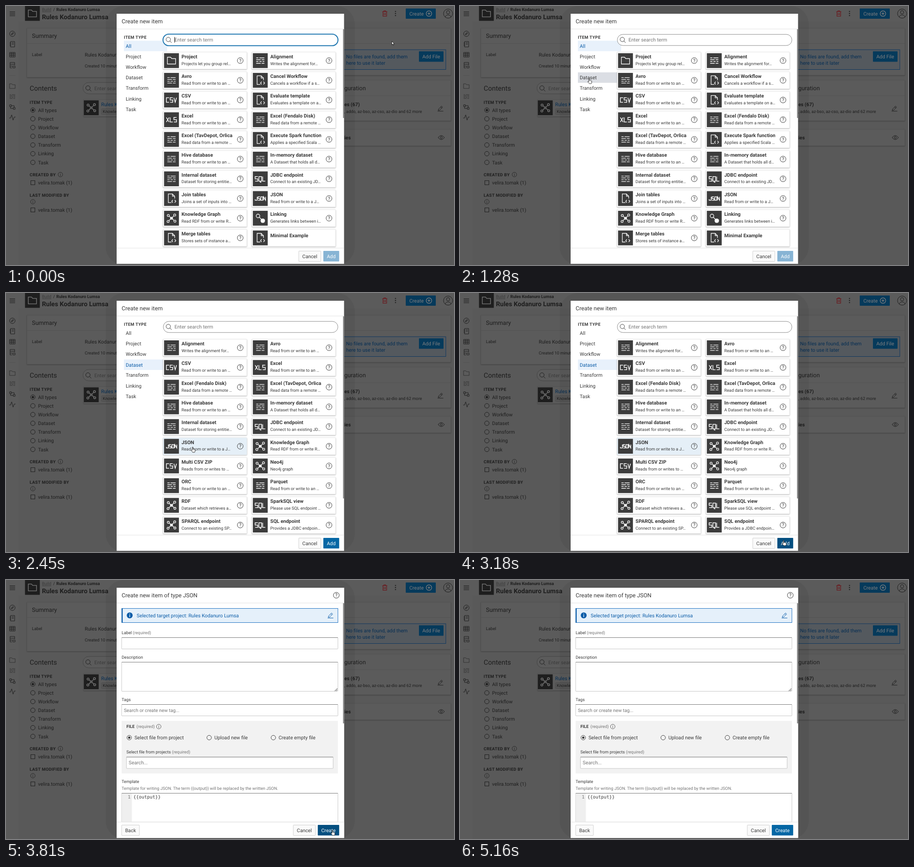
An HTML page that plays this animation: 984x569 px, repeating every 8 s.

```html
<!DOCTYPE html>
<html lang="en">
<head>
<meta charset="utf-8">
<title>Create new item</title>
<style>
html, body { margin: 0; width: 100%; height: 100%; overflow: hidden; background: #5a5a5a; }
svg { display: block; width: 984px; height: 569px; }
text { font: 10.8px Roboto, sans-serif; fill: #3a3a3a; text-rendering: geometricPrecision; white-space: pre; }
.sm { font-size: 9.26px; }
.md { font-size: 10.3px; }
.b { font-weight: 700; }
.cap { font-size: 9.3px; font-weight: 700; letter-spacing: .35px; }
.h1 { font-size: 14.1px; font-weight: 700; }
.h2 { font-size: 12.9px; }
.h3 { font-size: 14.9px; }
.title { font-size: 12.5px; }
.dim { fill: #757575; }
.blue { fill: #0a5ca8; }
.inv { fill: #fff; }
.mid { text-anchor: middle; }
.mono { font: 10px "DejaVu Sans Mono", monospace; }
.ln { fill: none; stroke: #3a3a3a; stroke-width: 1; }
.wl { fill: none; stroke: #fff; stroke-width: 1.3; }
.glyph { fill: none; stroke: #fff; stroke-width: 1.5; vector-effect: non-scaling-stroke; }
.bl { fill: none; stroke: #0a5ca8; stroke-width: 1; }
.red { fill: none; stroke: #da1e28; stroke-width: 1.1; }
.dot { fill: #3a3a3a; }
.white { fill: #fff; }
.tile { fill: #3c3c3c; }
.card { fill: #fff; stroke: #dcdcdc; stroke-width: .6; filter: drop-shadow(0 1px 1px rgba(0,0,0,.28)); }
.rule { fill: #dcdcdc; }
.field { fill: #fff; stroke: #b9b9b9; stroke-width: .8; }
.round { fill: #fff; stroke: #8a8a8a; stroke-width: 1; }
.sel { fill: #e8f1fb; }
.info { fill: #e5f0fa; stroke: #1a6fc0; stroke-width: 1; }
.btn { fill: #0567a5; }
.plain { fill: #fafafa; stroke: #c4c4c4; stroke-width: .8; }

/* The page behind the dialog */
.page .white, .page .card, .page .round { fill: #b8b8b8; }
.page .card { stroke: #a4a4a4; }
.page .rule { fill: #a4a4a4; }
.page .plain { fill: #aeaeae; stroke: #949494; }
.page .info { fill: #a9b3bd; }
.page .btn { fill: #0c74b8; }

/* 1% = 80 ms */
.all, .data, .picker, .form, .hover, .focus, .caret, .pick, .add, .create, .arrow, .hand, .cursor {
  animation: 8s step-end infinite;
}
.all { animation-name: all; }
.data { animation-name: data; }
.picker { animation-name: picker; }
.form { animation-name: form; }
.hover { animation-name: hover; fill: #dbdee4; }
.focus { animation-name: focus; }
.caret { animation-name: caret; }
.pick { animation-name: pick; fill: #e5eff7; }
.add { animation-name: add; }
.create { animation-name: create; }
.arrow { animation-name: arrow; }
.hand { animation-name: hand; }
.cursor { animation-name: move; }
.arrow path, .hand path { fill: #fff; stroke: #000; stroke-width: .8; stroke-linejoin: round; }
@keyframes all { 0% { opacity: 1 } 17.75%, 100% { opacity: 0 } }
@keyframes data { 0% { opacity: 0 } 17.75% { opacity: 1 } 47.625%, 100% { opacity: 0 } }
@keyframes picker { 0% { opacity: 1 } 47.625%, 100% { opacity: 0 } }
@keyframes form { 0% { opacity: 0 } 47.625%, 100% { opacity: 1 } }
@keyframes hover { 0% { opacity: 0 } 11.5% { opacity: .4 } 13% { opacity: .8 } 14.5% { opacity: 1 } 17.75%, 100% { opacity: 0 } }
@keyframes focus { 0% { opacity: 1 } 14.5%, 100% { opacity: 0 } }
@keyframes caret { 0% { opacity: 1 } 1.875% { opacity: 0 } 10% { opacity: 1 } 14.5%, 100% { opacity: 0 } }
@keyframes pick { 0% { opacity: 0 } 30.625%, 100% { opacity: 1 } }
@keyframes add { 0% { fill: #87b4d4 } 30.625% { fill: #0567a5 } 39.75% { fill: #044f80 } 46.125%, 100% { fill: #063a5e } }
@keyframes create { 0% { fill: #044f80 } 54.625%, 100% { fill: #0567a5 } }
@keyframes arrow {
  0% { opacity: 1 } 3.375% { opacity: 0 } 37.875% { opacity: 1 } 39.75% { opacity: 0 }
  54.625% { opacity: 1 } 64.5%, 100% { opacity: 0 }
}
@keyframes hand {
  0% { opacity: 0 } 3.375% { opacity: 1 } 37.875% { opacity: 0 } 39.75% { opacity: 1 } 54.625%, 100% { opacity: 0 }
}
@keyframes move {
  0% { transform: translate(847px, 77px) }
  1.875% { transform: translate(800px, 88px) }
  3.375% { transform: translate(620px, 128px) }
  4.875% { transform: translate(440px, 165px) }
  6.375% { transform: translate(359px, 179px) }
  8.25% { transform: translate(346px, 176px) }
  10% { transform: translate(318px, 170px) }
  11.5% { transform: translate(296px, 163px) }
  13% { transform: translate(285px, 160px) }
  14.5%, 16% { transform: translate(280px, 158.5px) }
  17.75% { transform: translate(297px, 175px) }
  19.25% { transform: translate(345px, 199px) }
  20.75% { transform: translate(382px, 216px) }
  23.875% { transform: translate(382px, 237px) }
  25.625% { transform: translate(394px, 290px) }
  27.125% { transform: translate(406px, 338px) }
  32.5% { transform: translate(419px, 347px) }
  36.375% { transform: translate(566px, 448px) }
  37.875% { transform: translate(697px, 535px) }
  39.75% { transform: translate(707px, 543px) }
  41.25% { transform: translate(713px, 549px) }
  54.625% { transform: translate(690px, 505px) }
  56.125% { transform: translate(612px, 402px) }
  57.625% { transform: translate(537px, 313px) }
  61.125% { transform: translate(372px, 311px) }
  62.625%, 100% { transform: translate(206px, 308px) }
}
</style>
</head>
<body>
<svg id="stage" viewBox="0 0 984 569" xmlns="http://www.w3.org/2000/svg"></svg>
<script>
const project = 'Rules Kodanuro Lumsa', user = 'velira.tomak (1)';

const text = (x, y, s, cls = '') => `<text x="${x}" y="${y}" class="${cls}">${s}</text>`;
const rect = (x, y, w, h, cls, rx = 0) => `<rect x="${x}" y="${y}" width="${w}" height="${h}" rx="${rx}" class="${cls}"/>`;
const circle = (x, y, r, cls = 'ln') => `<circle cx="${x}" cy="${y}" r="${r}" class="${cls}"/>`;
const path = (d, cls = 'ln', x = 0, y = 0) => `<path d="${d}" class="${cls}" transform="translate(${x} ${y})"/>`;
const group = (cls, body, x = 0, y = 0) => `<g class="${cls}"><g transform="translate(${x} ${y})">${body}</g></g>`;

const help = (x, y) => circle(x, y, 6.4) + text(x, y + 3.7, '?', 'mid');
const info = (x, y) => circle(x, y, 5, 'ln" stroke-opacity=".8') + path('M0-.8V3M0-3v1.1', 'ln" stroke-opacity=".8', x, y);
const lens = (x, y) => circle(x - 1, y - 1, 4.8) + path('M2.4 2.4 6.3 6.3', 'ln', x, y);
const pencil = (x, y, cls = 'ln') => path('M-4 1.5 2.6-5 5-2.6-1.6 3.8-4.6 4.3ZM.8-3.2 3.2-.8M-6 6H6.5', cls, x, y);
const radio = (x, y, label, on) => circle(x, y, 5) + (on ? circle(x, y, 2.5, 'dot') : '') + text(x + 11.5, y + 3.9, label);
const check = (x, y, label) => rect(x - 4.5, y - 4.5, 9, 9, 'ln') + text(x + 11.5, y + 3.9, label);
const button = (x, y, w, h, label, cls, tone = 'inv') =>
  rect(x, y, w, h, cls, 1) + text(x + w / 2, y + h / 2 + 3.9, label, 'mid ' + tone);
const input = (x, y, w, h) => rect(x, y, w, h, 'field', 1) + path(`M0 0H${w}`, 'ln" opacity=".55', x, y);

// Pictograms, drawn around 0,0
const strokes = {
  C: 'M6 0H0V10H6', S: 'M6 0H0V5H6V10H0', V: 'M0 0 3 10 6 0', X: 'M0 0 6 10M6 0 0 10', L: 'M0 0V10H6',
  Q: 'M0 0H6V10H0ZM3 10V12.5H5.5', J: 'M6 0V10H0V7', O: 'M0 0H6V10H0Z', N: 'M0 10V0L6 10V0'
};
const word = s => {
  const k = 3 / s.length, step = 8.2 * k;
  return [...s].map((ch, i) =>
    `<g transform="translate(${-11.2 + i * step} ${-5 * k}) scale(${k * .97} ${k})">${path(strokes[ch], 'glyph')}</g>`).join('');
};
const folder = 'M-9-7.5H-2L.5-4.5H9V7.5H-9Z';
const lines = 'M-9-6H-4M-2-6H9M-9-2H1M3-2H9M-9 2H-4M-2 2H3M5 2H9M-9 6H1M3 6H9';
const graph = [[-7, -6], [7, -7], [-7.5, 7], [7.5, 6.5]];
const icons = {
  folder: path(folder, 'wl'),
  lines: path(lines, 'wl'),
  file: path('M0 9H-7V-10H2L7-5V0M2-10V-5H7M3 3 .5 6 3 9M7 3 9.5 6 7 9', 'wl'),
  graph: graph.map(([x, y]) => path(`M0 0 ${x * .75} ${y * .75}`, 'wl') + circle(x, y, 2.3, 'wl')).join('') + circle(0, 0, 3, 'white'),
  link: circle(-5, -5, 4, 'wl') + path('M-2-2 3 3', 'wl') + circle(5.5, 5.5, 4.8, 'white')
};
const tile = (x, y, name, size = 32.6) => rect(x, y, size, size, 'tile') +
  group('', icons[name] || word(name), x + size / 2, y + size / 2);

const read = 'Read from or write to an …', remote = 'Read data from a remote …';
const items = {
  'Project': ['folder', 'Projects let you group rel…'],
  'Alignment': ['lines', 'Writes the alignment for…'],
  'Avro': ['lines', read],
  'Cancel Workflow': ['file', 'Cancels a workflow if a s…'],
  'CSV': ['CSV', read],
  'Evaluate template': ['file', 'Evaluates a template on a…'],
  'Excel': ['XLS', read],
  'Excel (Fendalo Disk)': ['lines', remote],
  'Excel (TavDepot, Orlica3)': ['lines', remote],
  'Execute Spark function': ['file', 'Applies a specified Scala …'],
  'Hive database': ['lines', read],
  'In-memory dataset': ['lines', 'A Dataset that holds all d…'],
  'Internal dataset': ['lines', 'Dataset for storing entitie…'],
  'JDBC endpoint': ['SQL', 'Connect to an existing JD…'],
  'Join tables': ['file', 'Joins a set of inputs into …'],
  'JSON': ['JSON', 'Read from or write to a J…'],
  'Knowledge Graph': ['graph', 'Read RDF from or write R…'],
  'Linking': ['link', 'Generates links between i…'],
  'Merge tables': ['file', 'Stores sets of instance a…'],
  'Minimal Example': ['file', ''],
  'Multi CSV ZIP': ['CSV', 'Reads from or writes to …'],
  'Neo4j': ['graph', 'Neo4j graph'],
  'ORC': ['lines', read],
  'Parquet': ['lines', read],
  'RDF': ['graph', 'Dataset which retrieves a…'],
  'SparkSQL view': ['SQL', 'Please use SQL endpoint …'],
  'SPARQL endpoint': ['graph', 'Connect to an existing SP…'],
  'SQL endpoint': ['SQL', 'Provides a JDBC endpoin…']
};
const names = Object.keys(items);
const everything = names.slice(0, 20);
const datasets = names.filter(n => !['folder', 'file', 'link'].includes(items[n][0]));

const card = (name, i, pickable) => {
  const [icon, desc] = items[name];
  return group('', rect(0, 0, 184, 37.5, 'card', 1) +
    (pickable && name === 'JSON' ? rect(0, 0, 184, 37.5, 'pick', 1) : '') +
    tile(2.2, 2.5, icon) +
    `<g clip-path="url(#crop)">${text(40.5, desc ? 13.7 : 17.2, name, 'b')}</g>` +
    (desc ? text(40.5, 28.6, desc, 'sm') + help(169.5, 18.7) : ''),
    345 + i % 2 * 195, 101.2 + (i >> 1) * 43.28);
};
const cards = (list, pickable) => list.map((n, i) => card(n, i, pickable)).join('');

const types = ['Project', 'Workflow', 'Dataset', 'Transform', 'Linking', 'Task'];

const sidebar =
  path('M0 0H12M0 3H12M0 6H12M0 9H12', 'ln', 8, 12.5) +
  circle(14, 61, 6) + path('M-2.5 2.5-1-1 2.5-2.5 1 1Z', 'ln', 14, 61) +
  path('M-4-6H5V6H-4ZM-6-3H-3M-6 0H-3M-6 3H-3M-1-3H3M-1 0H3', 'ln', 14, 84) +
  path('M-6-5H6V5H-6ZM-6-2H6M-6 1.5H6M-2-5V5M2-5V5', 'ln', 14, 107) +
  path('M-5-6H5V0M-5-6V6H-1M-5-2H5M-5 2H0M1 2H6V6H1Z', 'ln', 14, 130) +
  rect(7, 152, 14, .8, 'rule') +
  `<g transform="translate(14 176) scale(.68)">${path(folder)}</g>` +
  `<g transform="translate(14 199) scale(.68)">${path(lines)}</g>` +
  path('M-6-5H-2V-1H-6ZM2 1H6V5H2ZM-2-3H4V1M-4-1V3H2', 'ln', 14, 222) +
  path('M-7 1H-4L-1.5-6 1.5 6 4-1H7', 'ln', 14, 245);

const header =
  rect(0, 0, 984, 34, 'white') + tile(41.7, 0, 'folder') +
  text(79, 11.4, 'Build', 'sm dim" text-decoration="underline') + text(103.5, 11.4, '/', 'sm') + text(110.5, 11.4, project, 'sm b') +
  text(79, 29, project, 'h1') +
  path('M-5.5-4H5.5M-4-4V6H4V-4M-2-4V-6H2V-4M-1.5-1V3.5M1.5-1V3.5', 'red', 832, 16.5) +
  [12, 16.5, 21].map(y => circle(855.5, y, 1.2, 'dot')).join('') +
  rect(878, 5.5, 66, 22.5, 'btn', 1) + text(886, 20.6, 'Create', 'inv') +
  circle(929, 16.7, 6, 'wl') + path('M-3 0H3M0-3V3', 'wl', 929, 16.7) +
  circle(971, 16.7, 10) + circle(971, 13.8, 3.6) + path('M-6 7.5Q-5.5 3 0 3T6 7.5', 'ln', 971, 16.7);

const main =
  rect(46, 49, 679, 107.5, 'card') + rect(46, 82, 679, .8, 'rule') +
  text(57, 70.2, 'Summary', 'h2') + text(57, 109.6, 'Label', 'sm') +
  text(173, 111, project) + text(173, 135.4, 'Created 10 minutes ago', 'sm') +
  text(52, 185.7, 'Contents', 'h3') + rect(169, 168, 400, 25, 'round', 12.5) + lens(181, 181) + text(194, 184.6, 'Enter search term', 'dim') +
  text(52, 215.3, 'ITEM TYPE', 'cap') +
  ['All types', ...types].map((s, i) => radio(59, 228.7 + i * 19.15, s, !i)).join('') +
  text(52, 373.7, 'CREATED BY', 'cap') + info(119.5, 370.3) + check(59, 388.2, user) +
  text(52, 418.6, 'LAST MODIFIED BY', 'cap') + info(59, 430) + check(59, 448, user) +
  rect(170.5, 205.5, 400, 37, 'card') + tile(171, 207.3, 'graph') +
  text(209, 220, project, 'blue') + rect(209.5, 225.5, 80, 13, 'plain', 2) + text(212.5, 235.2, 'Knowledge Graph', 'sm');

const aside =
  rect(735, 49, 242, 103, 'card') + rect(735, 82, 242, .8, 'rule') +
  rect(735, 96, 231, 43.5, 'info') + text(747, 115, 'No files are found, add them', 'blue') + text(747, 129.4, 'here to use it later', 'blue') +
  button(907, 99.5, 54, 23, 'Add File', 'btn') +
  rect(735, 163, 242, 89, 'card') + rect(735, 196.5, 242, .8, 'rule') +
  text(743, 185, 'guration', 'h2') + text(743, 220, 'es (67)', 'b') +
  text(743, 234.8, ', addo, az-bso, az-cso, az-dio and 62 more', 'sm') + pencil(954, 225) +
  rect(735, 271, 242, 36, 'card') + text(743, 293, 'ies', 'b') +
  path('M-7 0Q0-9 7 0Q0 9-7 0Z', 'ln', 956, 289) + circle(956, 289, 2.3);

const row = i => 76.3 + i * 23.15;
const marked = (i, s) => rect(259, row(i), 95, 23, 'sel') + text(263, row(i) + 15.5, s, 'blue');
const thumb = bottom => `<rect x="740.3" y="51" width="2.4" height="${bottom - 51}" fill="#808080"/>`;

const picker =
  text(254, 37.6, 'Create new item', 'title') + text(259, 72.2, 'ITEM TYPE', 'cap') +
  rect(259, row(3), 95, 23, 'hover') +
  ['All', ...types].map((s, i) => text(263, row(i) + 15.5, s)).join('') +
  group('all', marked(0, 'All') + cards(everything) + thumb(246)) +
  group('data', marked(3, 'Dataset') + cards(datasets, true) + thumb(451), 0, .3) +
  rect(345.5, 62.3, 383.5, 24.5, 'round', 12.2) +
  group('focus', '<rect x="345" y="62" width="384" height="25" rx="12.5" fill="none" stroke="#c3dbed" stroke-width="4"/>' +
    '<rect x="345" y="62" width="384" height="25" rx="12.5" fill="#fff" stroke="#0567a5" stroke-width="1.6"/>') +
  lens(357.5, 74.5) + text(370, 78.3, 'Enter search term', 'dim') + rect(370, 68, .9, 12.5, 'caret') +
  rect(243, 531.5, 499.5, .8, 'rule') +
  button(643, 538.3, 48.6, 23, 'Cancel', 'plain', '') + button(697, 538, 34.8, 23.3, 'Add', 'add');

const required = (x, y) => text(x, y, '(required)', 'sm dim');
const form =
  rect(243, 17, 499.5, 549.5, 'white') + rect(243, 50, 499.5, .8, 'rule') +
  text(254, 37.6, 'Create new item of type JSON', 'title') + help(725.5, 33.5) + thumb(315) +
  rect(254.5, 62.5, 474.5, 31, 'info') + `<path d="M255 62V94" stroke="#0a5ca8" stroke-width="2.5"/>` +
  circle(271.7, 77.7, 6.5, 'blue') + path('M0-1V3.8M0-4V-2.3', 'wl', 271.7, 77.7) +
  text(287, 81.6, 'Selected target project: ' + project, 'blue') + pencil(712.5, 77.5, 'bl') +
  text(254, 119, 'Label', 'sm') + required(278.5, 119) + input(254, 126.5, 475, 25) +
  text(254, 172.6, 'Description', 'sm') + input(254, 180.5, 475, 64) + path('M0 6 6 0M3 6 6 3', 'ln', 722, 238) +
  text(254, 266.4, 'Tags', 'sm') + input(254, 273.5, 475, 25) + text(259, 289.8, 'Search or create new tag...', 'md dim') +
  '<rect x="254" y="309.5" width="475" height="115.5" fill="#f2f2f2"/>' +
  text(264.5, 325.4, 'FILE', 'sm b') + required(286.5, 325.4) + info(335.5, 322) +
  radio(270.7, 346.3, 'Select file from project', true) + radio(446.2, 346.3, 'Upload new file') + radio(587.2, 346.3, 'Create empty file') +
  text(264.5, 381.2, 'Select file from projects', 'sm') + required(364.5, 381.2) +
  input(264.5, 389, 454, 25) + text(269.5, 405.4, 'Search...', 'dim') +
  text(254, 445.8, 'Template', 'sm') +
  text(254, 461, 'Template for writing JSON. The term {{output}} will be replaced by the written JSON.', 'sm dim') +
  input(254, 468.5, 475, 63) + '<rect x="254.5" y="469" width="22" height="62.5" fill="#efefef"/>' +
  text(267.5, 480.4, '1', 'mono dim') + text(279.7, 480.4, '{{output}}', 'mono') +
  rect(243, 531.5, 499.5, 35, 'white') + rect(243, 531.5, 499.5, .8, 'rule') +
  button(254, 538.3, 39, 23, 'Back', 'plain', '') + button(631, 538.3, 48.6, 23, 'Cancel', 'plain', '') +
  button(684.8, 538, 47, 23.3, 'Create', 'create');

const cursor =
  group('arrow', path('M.4.4V8.2L2.2 6.6 3.5 9.5 4.7 9 3.5 6.2H5.8Z', '')) +
  group('hand', path('M3 7.8V1.3a.9.9 0 0 1 1.8 0V5.2q.9-.7 1.6.3q.9-.5 1.5.4q1.3-.3 1.4 1V9q0 1.8-1 3H4Q3 10.5.9 8.3Q.2 7.2 1.4 6.9Q2.2 6.9 3 7.8Z', ''));

document.getElementById('stage').innerHTML =
  '<clipPath id="crop"><rect x="0" y="0" width="152.5" height="38"/></clipPath>' +
  '<rect width="984" height="569" fill="#b4b4b4"/>' +
  group('page', rect(0, 0, 28, 569, 'white') + header + sidebar + main + aside) +
  '<rect width="984" height="569" opacity=".5"/>' +
  '<rect x="219" width="547" height="569" rx="40" opacity=".06"/>' +
  rect(243, 17, 499.5, 549.5, 'white') + rect(243, 50, 499.5, .8, 'rule') +
  group('picker', picker) + group('form', form) + group('cursor', cursor);
</script>
</body>
</html>
```
